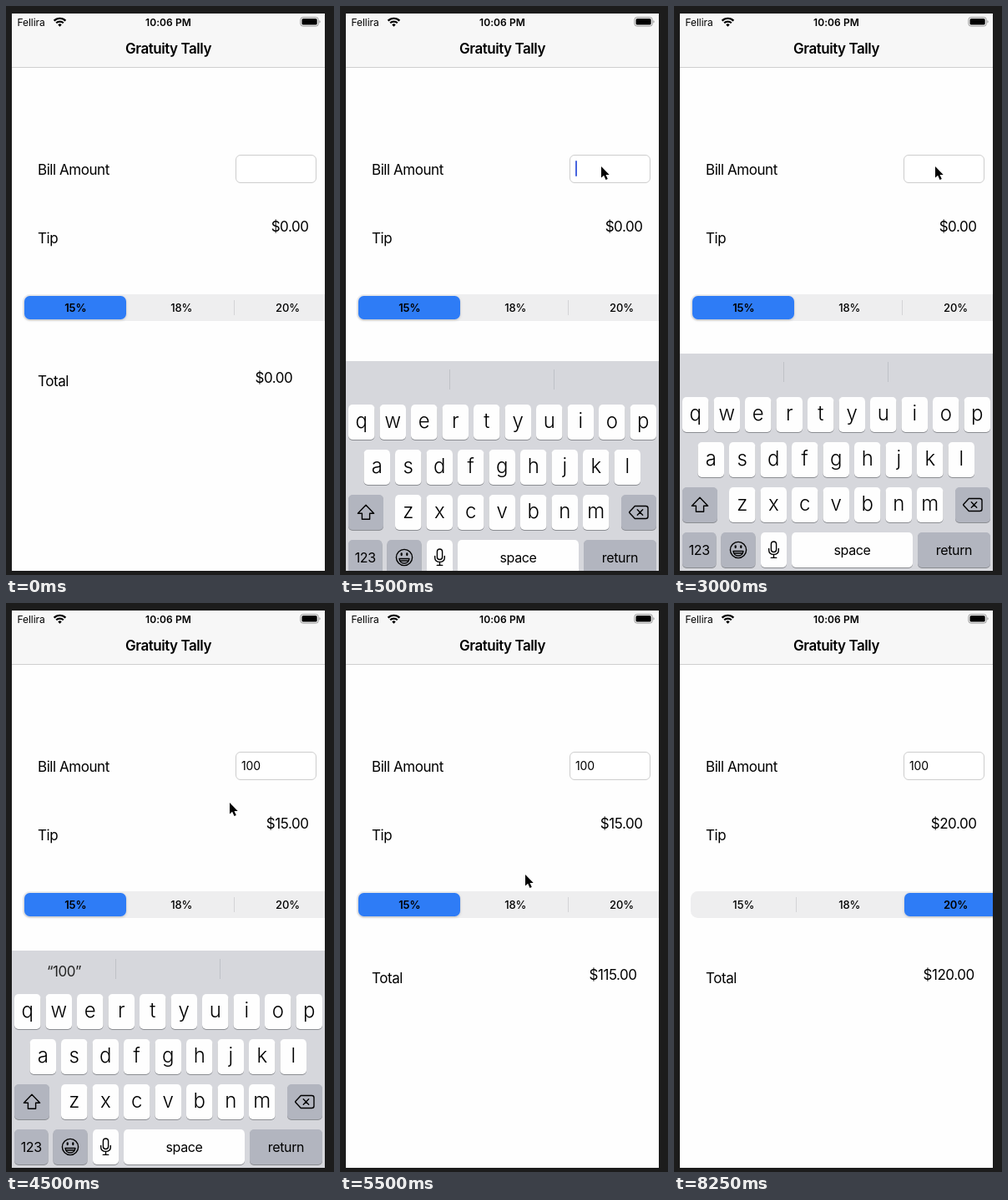
Animation of 393x681 px, one loop 8750 ms. Source, as an HTML page:

```html
<!DOCTYPE html>
<html lang="en">
<head>
<meta charset="utf-8">
<title>Gratuity Tally</title>
<style>
  html, body { margin: 0; width: 100%; height: 100%; overflow: hidden; background: #1c1c1c; }
  svg { display: block; width: 393px; height: 681px; }
  text { font: 400 17px Inter, Roboto, sans-serif; letter-spacing: -.45px; fill: #000; white-space: pre; }
  .mid { text-anchor: middle; }
  .end { text-anchor: end; }
  .status { font-size: 12px; letter-spacing: -.05px; }
  .clock { font-size: 12px; font-weight: 600; letter-spacing: .1px; }
  .title { font-weight: 600; }
  .input { font-size: 14px; letter-spacing: -.15px; }
  .seg { font-size: 13px; font-weight: 500; letter-spacing: -.1px; }
  .seg.on { font-weight: 600; }
  .seg.pressed { opacity: .7; }
  .letter { font-size: 24px; font-weight: 300; letter-spacing: 0; }
  .word { font-size: 16px; letter-spacing: -.35px; }
  .icon { fill: none; stroke: #000; stroke-width: 1.4; stroke-linecap: round; stroke-linejoin: round; }
</style>
</head>
<body>
<svg viewBox="0 0 393 681">
  <defs>
    <clipPath id="screen"><rect x="7" y="9" width="375" height="667"/></clipPath>
    <filter id="soft" x="-10%" y="-20%" width="120%" height="150%">
      <feDropShadow dx="0" dy="1" stdDeviation="1.5" flood-opacity=".2"/>
    </filter>
  </defs>
  <rect width="393" height="681" fill="#1c1c1c"/>
  <g clip-path="url(#screen)">
    <rect x="7" y="9" width="375" height="667" fill="#fefefe"/>

    <rect x="7" y="9" width="375" height="64" fill="#f7f7f7"/>
    <rect x="7" y="73" width="375" height="1" fill="#cfcfcf"/>
    <text class="status" x="13.5" y="24">Fellira</text>
    <g fill="none" stroke="#000" stroke-width="2.2">
      <path d="M57.6 17.6A9.8 9.8 0 0 1 71.4 17.6"/>
      <path d="M60.2 20.3A6.1 6.1 0 0 1 68.8 20.3"/>
      <path d="M64.5 24.8L62.3 22.4A3.2 3.2 0 0 1 66.7 22.4Z" fill="#000" stroke="none"/>
    </g>
    <text class="clock mid" x="194.5" y="24">10:06 PM</text>
    <rect x="352.9" y="13.5" width="21.4" height="10.6" rx="2.9" fill="none" stroke="#9b9b9b"/>
    <rect x="354.5" y="15.1" width="18.2" height="7.4" rx="1.6"/>
    <path d="M375.4 17v3.6q1.3-.5 1.3-1.8t-1.3-1.8z" fill="#9b9b9b"/>
    <text class="title mid" x="194.5" y="57">Gratuity Tally</text>

    <text x="38" y="202">Bill Amount</text>
    <rect x="275.5" y="178.5" width="96" height="33" rx="5.5" fill="#fff" stroke="#cdcdcd"/>
    <text class="input" id="bill" x="282" y="200"></text>
    <rect id="caret" y="185" width="2" height="19" rx="1" fill="#4663de"/>

    <text x="38" y="284">Tip</text>
    <text class="end" id="tip" x="362.5" y="270"></text>

    <rect x="20" y="345" width="382" height="32" rx="8.5" fill="#eeeeef"/>
    <rect class="bar" x="146" y="352" width="1" height="18" fill="#d3d3d6"/>
    <rect class="bar" x="273" y="352" width="1" height="18" fill="#d3d3d6"/>
    <rect id="thumb" x="22" y="347" width="122" height="28" rx="6.5" fill="#2f7bf6" filter="url(#soft)"/>
    <text class="seg mid" x="83.3" y="365.5">15%</text>
    <text class="seg mid" x="210.3" y="365.5">18%</text>
    <text class="seg mid" x="337.6" y="365.5">20%</text>

    <text x="38" y="455">Total</text>
    <text id="total" x="298.5" y="451"></text>

    <g id="board">
      <rect x="7" y="416" width="375" height="262" fill="#d6d7dc"/>
      <path d="M131.5 426v24M256.5 426v24" stroke="#bfc1c7"/>
      <text class="mid" id="hint" x="69.5" y="447" style="fill:#222"></text>
      <g id="keys"></g>
      <path class="icon" d="M31 588.3L40.6 598.2H35.6V605.2H26.4V598.2H21.4Z"/>
      <path class="icon" d="M353.3 589.5H366.4Q369 589.5 369 592V602Q369 604.5 366.4 604.5H353.3L346.8 597.6Q346.4 597 346.8 596.4ZM356.3 593.8l6.4 6.4M362.7 593.8l-6.4 6.4"/>
      <g class="icon" stroke-width="1.3">
        <circle cx="77" cy="651" r="9.6"/>
        <path d="M71 652.5H83Q82.3 658 77 658T71 652.5ZM72 655H82"/>
        <path d="M73.7 646.3v1.8M80.3 646.3v1.8" stroke-width="2.2"/>
        <rect x="116.4" y="641" width="6.2" height="12.5" rx="3.1"/>
        <path d="M113.7 649.5V651.3Q113.7 656.4 119.5 656.4T125.3 651.3V649.5M119.5 656.4V660.2M116.3 660.4H122.7"/>
      </g>
    </g>
  </g>
  <path id="mouse" d="M0 0V13.6L3.1 10.8L5.5 16.1L7.8 15.1L5.5 9.9H9.7Z" fill="#000" stroke="#fff" stroke-width="1" paint-order="stroke"/>
</svg>
<script>
const LOOP = 8750, TICK = 250, BOARD = 260;
const $ = id => document.getElementById(id);
const NS = 'http://www.w3.org/2000/svg';

function add(parent, tag, attrs, text = '') {
  const el = document.createElementNS(NS, tag);
  for (const name in attrs) el.setAttribute(name, attrs[name]);
  el.textContent = text;
  parent.append(el);
}

function addKey(x, y, width, label = '', kind = 'letter', fill = '#fefefe') {
  const box = { x, width, height: 42, rx: 5 };
  add($('keys'), 'rect', { ...box, y: y + 1, fill: '#8b8d92' });
  add($('keys'), 'rect', { ...box, y, fill });
  if (label) {
    const base = y + (kind === 'letter' ? 28 : 26.5);
    add($('keys'), 'text', { class: kind + ' mid', x: x + width / 2, y: base }, label);
  }
}

[['qwertyuiop', 10, 468], ['asdfghjkl', 28.5, 522], ['zxcvbnm', 66, 576]].forEach(([row, x, y]) =>
  [...row].forEach((letter, i) => addKey(x + i * 37.5, y, 31.5, letter)));
const GREY = '#b2b5bf';
addKey(10, 576, 42, '', 'word', GREY);
addKey(337, 576, 42, '', 'word', GREY);
addKey(10, 630, 40.5, '123', 'word', GREY);
addKey(56.5, 630, 41, '', 'word', GREY);
addKey(104, 630, 31, '', 'word');
addKey(141, 630, 145, 'space', 'word');
addKey(292, 630, 87, 'return', 'word', GREY);

// Each track lists [start in ms, value...]; values hold until the next entry.
const tracks = {
  mouse: [[0], [500, 381, 15], [750, 372, 62], [1000, 343, 142], [1250, 313, 192],
    [4000, 303, 206], [4250, 268, 239], [5250, 244, 282], [5500, 222, 325], [5750, 206, 358],
    [6250, 252, 359], [6500, 305, 360], [7000, 318, 405], [7250, 333, 491], [7500, 336, 473],
    [8000, 372, 445], [8250]],
  board: [[0, BOARD], [1500, 9], [1750, 0], [4750, 221], [5000, BOARD]],
  caret: [[0, 0], [1500, 1], [2000, 0], [2500, 1], [3000, 0], [3250, 1], [4500, 0]],
  bill: [[0, ''], [3250, '1'], [3500, '10'], [3750, '100']],
  choice: [[0, 0], [6000, 1], [6750, 2]],
  pressed: [[0, -1], [5750, 1], [6000, -1], [6500, 2], [6750, -1]]
};
const at = (name, t) => tracks[name].findLast(step => step[0] <= t).slice(1);
const money = value => '$' + value.toFixed(2);
const segs = [...document.querySelectorAll('.seg')];
const bars = [...document.querySelectorAll('.bar')];
const rates = [.15, .18, .2];

function draw(now) {
  const t = Math.floor(now % LOOP / TICK) * TICK;
  const [bill] = at('bill', t), [choice] = at('choice', t), [pressed] = at('pressed', t);
  const tip = bill * rates[choice];

  $('bill').textContent = bill;
  $('hint').textContent = bill && `“${bill}”`;
  $('tip').textContent = money(tip);
  $('total').textContent = money(+bill + tip);

  $('thumb').setAttribute('x', 22 + choice * 127);
  segs.forEach((seg, i) => {
    seg.classList.toggle('on', i === choice);
    seg.classList.toggle('pressed', i === pressed);
  });
  bars.forEach((bar, i) => bar.style.opacity = +(choice !== i && choice !== i + 1));

  $('caret').setAttribute('x', 282 + (bill ? $('bill').getComputedTextLength() + 1 : 0));
  $('caret').style.opacity = at('caret', t)[0];
  $('board').setAttribute('transform', `translate(0 ${at('board', t)[0]})`);

  const [x, y] = at('mouse', t);
  $('mouse').style.opacity = x === undefined ? 0 : 1;
  $('mouse').setAttribute('transform', `translate(${x || 0} ${y || 0})`);
  requestAnimationFrame(draw);
}
draw(0);
</script>
</body>
</html>
```
